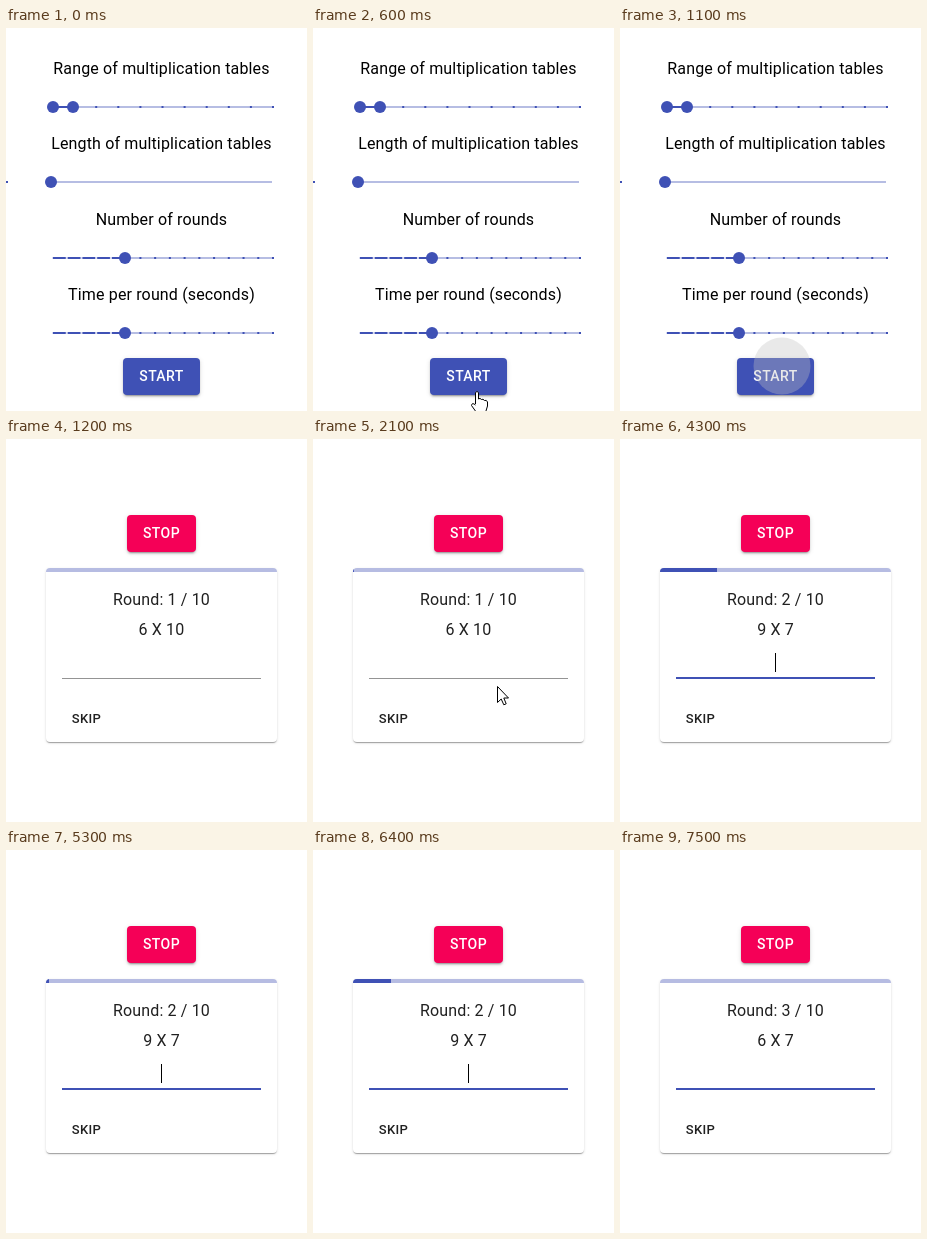
An HTML page that plays this animation: 301 px wide and 383 px high, repeating every 8 s.

```html
<!DOCTYPE html>
<html lang="en">
<head>
<meta charset="utf-8">
<title>Multiplication practice</title>
<style>
  html, body { margin: 0; width: 100%; height: 100%; overflow: hidden; background: #fff; }
  .box { position: absolute; box-sizing: border-box; border-radius: 4px; }
  .button { height: 36.5px; box-shadow: 0 3px 1px -2px rgba(0,0,0,.2), 0 2px 2px rgba(0,0,0,.14), 0 1px 5px rgba(0,0,0,.12); }
  #start { left: 117px; top: 330px; width: 77px; background: #3f51b5; }
  #stop { left: 121px; top: 76px; width: 69px; background: #f50057; }
  #card { left: 40px; top: 129px; width: 231px; height: 174px; overflow: hidden; background: #fff;
    box-shadow: 0 2px 1px -1px rgba(0,0,0,.2), 0 1px 1px rgba(0,0,0,.14), 0 1px 3px rgba(0,0,0,.12); }
  #track { height: 4px; background: #b6bce2; }
  #bar { height: 4px; background: #3f51b5; }
  svg { position: absolute; left: 0; top: 0; }
  text { font: 400 16px Roboto, sans-serif; letter-spacing: .15px; text-anchor: middle; }
  text.label { font-weight: 500; font-size: 14px; letter-spacing: .4px; fill: #fff; }
  text.small { font-size: 13px; fill: #212121; }
  #gameText { fill: #212121; }
  [hidden] { display: none; }
</style>
</head>
<body>
<div id="setupBoxes"><div class="box button" id="start"></div></div>
<div id="gameBoxes">
  <div class="box button" id="stop"></div>
  <div class="box" id="card"><div id="track"><div id="bar"></div></div></div>
</div>
<svg width="301" height="383" viewBox="0 0 301 383">
  <g id="setup">
    <text x="155.5" y="46">Range of multiplication tables</text>
    <text x="155.5" y="121">Length of multiplication tables</text>
    <text x="155.5" y="197">Number of rounds</text>
    <text x="155.5" y="272">Time per round (seconds)</text>
    <g id="sliders"></g>
    <text class="label" x="155.5" y="353">START</text>
  </g>
  <g id="game">
    <text class="label" x="155.5" y="99">STOP</text>
    <g id="gameText">
      <text id="round" x="155.5" y="166"></text>
      <text id="task" x="155.5" y="196"></text>
      <text id="answer" x="155.5" y="229"></text>
    </g>
    <rect id="rule" x="56" width="199"/>
    <rect id="focus" y="238" height="2" fill="#3f51b5"/>
    <rect id="caret" y="214" width="1" height="19"/>
    <text class="label small" x="80.5" y="284">SKIP</text>
  </g>
  <circle id="click" fill="#c0c0c0" fill-opacity=".35"/>
  <g id="pointer" fill="#fff" stroke="#000" stroke-linejoin="round">
    <path id="arrow" d="M.5 .5V16.5L4.2 13L6.8 18.8L9.2 17.8L6.8 12H11.5Z"/>
    <path id="hand" d="M-1.5 13V1.5Q0 -.5 1.5 1.5V8Q3 6.5 4.5 8.5Q6 7.5 7.5 9.5Q9.5 8.5 10.5 11V15L8.5 21.5H-.5L-5.5 14.5Q-5 11 -1.5 14"/>
    <path id="beam" fill="none" d="M-3 -7.5H-1L0 -6.5L1 -7.5H3M0 -6.5V6.5M-3 7.5H-1L0 6.5L1 7.5H3"/>
  </g>
</svg>
<script>
const $ = id => document.getElementById(id);
const LOOP = 8000, STEP = 100, MIDDLE = 155.5;
const GAME_START = 1200, FOCUS = 2600;

const rounds = [[GAME_START, "6 X 10"], [4300, "9 X 7"], [7200, "6 X 7"]];
const answers = [[0, ""], [4000, "6"], [4200, "60"], [4300, ""], [6900, "6"], [7100, "63"], [7200, ""]];
const caretOn = [[FOCUS, 3100], [3600, 4600], [5000, 5500], [6000, 6500], [6900, 7500]];
const ticks = [[2075, 10], [2990, 20], [3930, 30], [4250, 0], [5250, 10], [6155, 20], [7030, 30], [7105, 0]];
const clicks = [[1000, 162, 338], [FOCUS, 188, 210]];

// time, x, y, shape
const moves = [
  [[200, 263, 171, "hand"], [300, 256, 210, "arrow"], [400, 236, 265, "arrow"],
   [500, 200, 325, "arrow"], [600, 164, 363, "hand"], [700, 162, 338, "hand"], [800]],
  [[1600, 163, 319, "arrow"], [1800, 170, 300, "arrow"], [2000, 178, 275, "arrow"],
   [2100, 184, 247, "arrow"], [2400, 184, 247, "arrow"], [2500, 188, 215, "beam"],
   [2600, 188, 210, "beam"], [2800]],
];

const lastBefore = (list, t) => list.filter(item => item[0] <= t).pop();
const show = (id, on) => $(id).toggleAttribute("hidden", !on);
const clamp = v => Math.min(1, Math.max(0, v));

function put(id, attrs) {
  for (const key in attrs) $(id).setAttribute(key, attrs[key]);
}

function slider(y, left, steps, thumbs, from, to) {
  const rect = (x, w, fill, opacity = 1) =>
    `<rect x="${x}" y="${y - 1}" width="${w}" height="2" fill="${fill}" opacity="${opacity}"/>`;
  let out = rect(left, 221, "#3f51b5", .38) + rect(from, to - from, "#3f51b5");
  for (let i = 0; i <= steps; i++) {
    const x = left + 221 * i / steps;
    const active = x >= from && x <= to;
    out += rect(x - 1, 2, active ? "#fff" : "#3f51b5", active ? .8 : 1);
  }
  return out + thumbs.map(x => `<circle cx="${x}" cy="${y}" r="6" fill="#3f51b5"/>`).join("");
}

$("sliders").innerHTML =
  slider(79, 46, 10, [47, 67], 47, 67) +
  slider(154, 45, 0, [45], 45, 45) +
  slider(230, 46, 15, [119], 46, 119) +
  slider(305, 46, 15, [119], 46, 119);

function progress(t) {
  let value = 0, from = 0, target = 0, begun = -1e4;
  const at = time => from + (target - from) * clamp((time - begun) / 390);
  for (const [time, next] of ticks) {
    if (time > t) break;
    value = at(time);
    [from, target, begun] = [value, next, time];
  }
  return at(t);
}

function drawPointer(t) {
  const path = moves.find(m => t >= m[0][0] && t < m[m.length - 1][0]);
  show("pointer", path);
  if (!path) return;
  const a = lastBefore(path, t), next = path[path.indexOf(a) + 1];
  const b = next.length > 1 ? next : a;
  const k = b === a ? 0 : (t - a[0]) / (b[0] - a[0]);
  const mix = i => a[i] + (b[i] - a[i]) * k;
  put("pointer", { transform: `translate(${mix(1)} ${mix(2)})` });
  for (const id of ["arrow", "hand", "beam"]) show(id, id === a[3]);
}

function drawClick(t) {
  const hit = clicks.find(([time]) => t >= time && t < time + 200);
  show("click", hit);
  if (hit) put("click", { cx: hit[1], cy: hit[2], r: 17 + (t - hit[0]) * .115 });
}

function drawGame(t) {
  const round = lastBefore(rounds, t);
  const answer = lastBefore(answers, t)[1];
  $("round").textContent = `Round: ${rounds.indexOf(round) + 1} / 10`;
  $("task").textContent = round[1];
  $("answer").textContent = answer;
  $("bar").style.width = progress(t) + "%";

  const hover = t >= 2500 && t < 2800;
  put("rule", { y: hover ? 238 : 239, height: hover ? 2 : 1, fill: hover ? "#212121" : "#949494" });
  const width = 199 * (1 - (1 - clamp((t - FOCUS + 50) / 200)) ** 3);
  show("focus", t >= FOCUS);
  put("focus", { x: MIDDLE - width / 2, width });
  show("caret", caretOn.some(([on, off]) => t >= on && t < off));
  put("caret", { x: Math.round(MIDDLE - .5 + answer.length * 4.55) });
}

function draw(now) {
  const t = Math.floor(now % LOOP / STEP) * STEP;
  const playing = t >= GAME_START;
  for (const id of ["setup", "setupBoxes"]) show(id, !playing);
  for (const id of ["game", "gameBoxes"]) show(id, playing);
  if (playing) drawGame(t);
  drawClick(t);
  drawPointer(t);
}

let origin;
function frame(now) {
  origin ??= now;
  draw(now - origin);
  requestAnimationFrame(frame);
}
draw(0);
requestAnimationFrame(frame);
</script>
</body>
</html>
```
